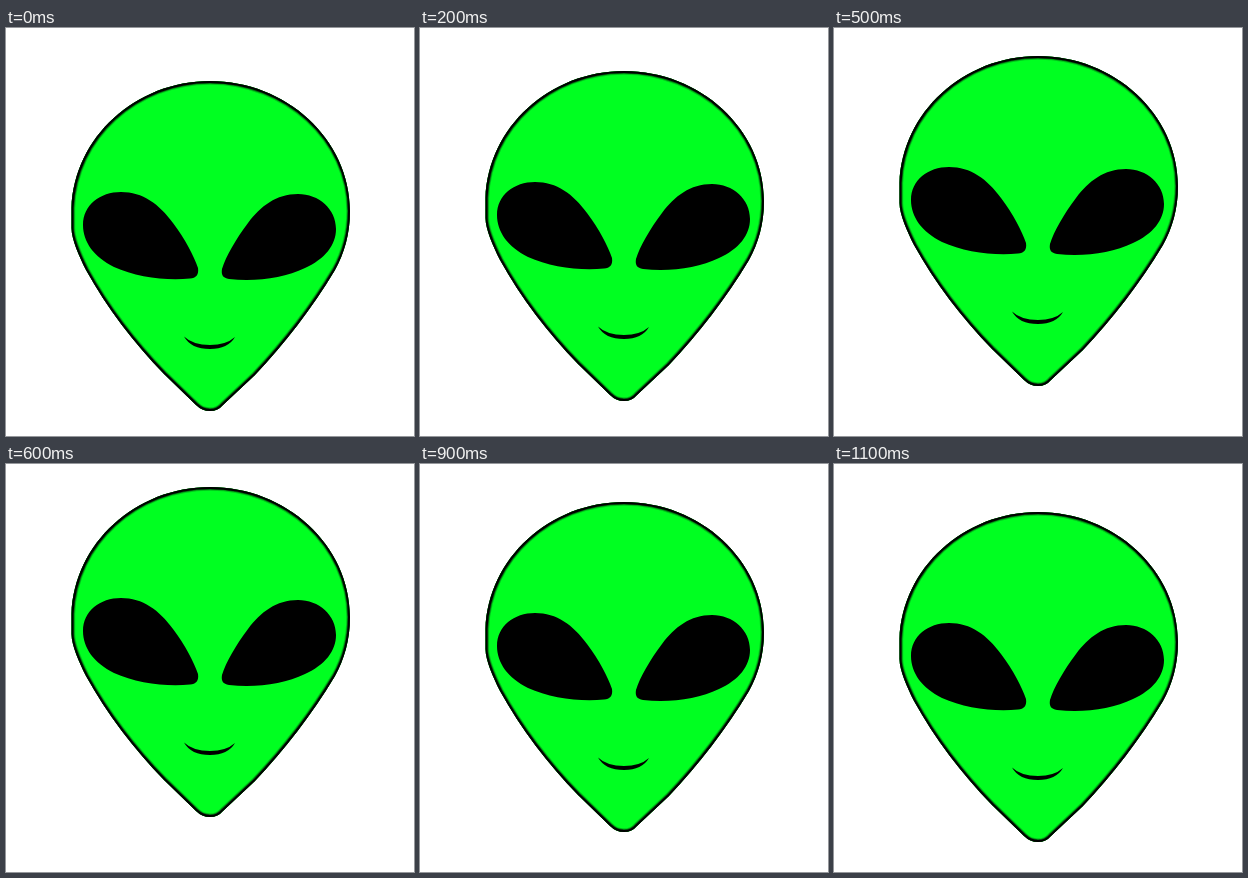
Write an HTML page that moves like this. It is 408 by 408 pixels and loops after 1200 ms.

```html
<!DOCTYPE html>
<html lang="en">
<head>
<meta charset="utf-8">
<title>Floating alien</title>
<style>
  html, body { margin: 0; width: 100%; height: 100%; overflow: hidden; background: #fff; }
  svg { display: block; width: 100%; height: 100%; }
</style>
</head>
<body>
<svg viewBox="0 0 408 408">
  <defs>
    <path id="head" d="M65.5 180 C68 109 130 53 204 53 C280 53 344 111 344 183
      C344 206 338 226 329 242 C305 282 279 315 249 347 L217 377
      Q212 383 204 383 Q196 383 190 377 L158 346
      C128 315 101 280 80 242 C73 228 65.5 211 65.5 200 Z"/>
    <clipPath id="inside"><use href="#head"/></clipPath>
  </defs>
  <g id="alien">
    <g clip-path="url(#inside)">
      <use href="#head" fill="#00ff21"/>
      <g fill="none">
        <use href="#head" stroke="#00c81a" stroke-width="7.4"/>
        <use href="#head" stroke="#006a0e" stroke-width="5.6"/>
        <use href="#head" stroke="#000" stroke-width="4"/>
      </g>
    </g>
    <path d="M77 197 C77 177 94 164 115 164 C137 164 153 176 167 195
      C179 211 188 228 192 240 C193 247 190 250 184 250.5
      C160 253 130 249 108 239 C88 229 77 214 77 197 Z"/>
    <path d="M330 201 C330 181 313 166 292 166 C270 166 255 178 242 195
      C230 211 220 228 216 241 C215 247 217 250 223 251
      C250 254 278 250 299 240 C319 231 330 217 330 201 Z"/>
    <path d="M178 308.5 Q185 321 204 321 Q222 321 229 309 Q220 317 204 317 Q187 317 178 308.5 Z"/>
  </g>
</svg>
<script>
  const STEP_MS = 100, STEPS = 12, RISE = 5;
  const alien = document.getElementById("alien");
  const start = performance.now();

  // Rises for half the loop, then sinks back, in hard steps.
  function draw(ms) {
    const step = Math.floor(ms / STEP_MS) % STEPS;
    const height = RISE * (STEPS / 2 - Math.abs(STEPS / 2 - step));
    alien.setAttribute("transform", `translate(0 ${-height})`);
  }

  function tick() {
    draw(performance.now() - start);
    requestAnimationFrame(tick);
  }
  tick();
</script>
</body>
</html>
```
